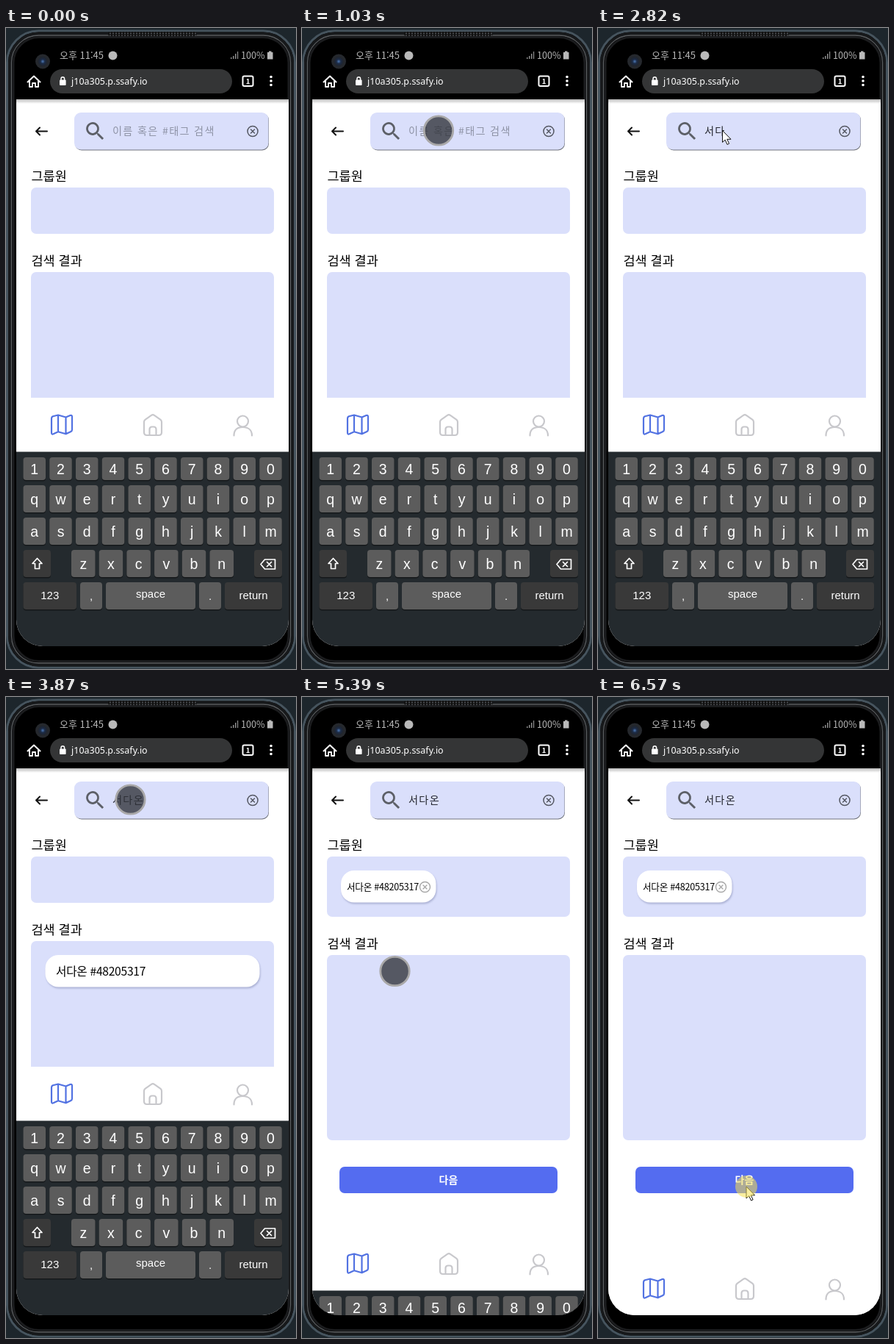
Write an HTML page that moves like this. It is 395 px wide and 872 px high and loops after 6640 ms.

```html
<!DOCTYPE html>
<html lang="ko">
<head>
<meta charset="utf-8">
<title>Group search</title>
<style>
html, body { margin: 0; width: 100%; height: 100%; overflow: hidden; background: #1d262c; }
svg { display: block; width: 395px; height: 872px; font-family: "Noto Sans CJK KR", "Noto Sans", sans-serif; }
text { white-space: pre; }
.line { fill: none; stroke-linecap: round; stroke-linejoin: round; }
.tint { fill: #dadffb; }
#keys { font-family: "Liberation Sans", Arial, sans-serif; text-anchor: middle; fill: #fff; }
#field { font-size: 14.2px; letter-spacing: 1.3px; }
.card { fill: #fff; filter: drop-shadow(1px 2px 1px #8f96bd99); }
</style>
</head>
<body>
<svg viewBox="0 0 395 872">
  <defs>
    <clipPath id="screen"><path d="M14 97H385V805a36 36 0 0 1-36 36H50a36 36 0 0 1-36-36z"/></clipPath>
    <linearGradient id="shade" x2="0" y2="1"><stop stop-color="#bbb"/><stop offset="1" stop-color="#fff"/></linearGradient>
    <radialGradient id="lens"><stop stop-color="#4d79b5"/><stop offset=".45" stop-color="#1c2b46"/><stop offset="1" stop-color="#20242b"/></radialGradient>
    <pattern id="grille" width="4" height="3" patternUnits="userSpaceOnUse"><rect width="4" height="3" fill="#111"/><circle cx="2" cy="1.5" r="1" fill="#505357"/></pattern>
  </defs>

  <!-- phone body -->
  <rect x="1.5" y="4" width="392" height="866" rx="43" stroke="#46545e" stroke-width="3"/>
  <rect x="5" y="7.5" width="385" height="859" rx="40" fill="none" stroke="#17191b" stroke-width="4"/>
  <rect x="7.5" y="10" width="380" height="854" rx="37" fill="none" stroke="#5c5f62" stroke-width="1.3"/>
  <rect x="10" y="12.5" width="375" height="849" rx="35" fill="none" stroke="#1b1c1e" stroke-width="3"/>
  <rect x="139" y="5" width="121" height="6" rx="3" fill="url(#grille)"/>
  <circle cx="50" cy="45.5" r="10" fill="#25282d"/>
  <circle cx="50" cy="45.5" r="6.5" fill="url(#lens)"/>

  <!-- status and address bars -->
  <g fill="#b9b9b9" font-size="13">
    <text x="73" y="42">오후 <tspan font-weight="500">11:45</tspan></text>
    <circle cx="145.5" cy="37.5" r="6"/>
    <path d="M306 42v-2h1.5v2zm3 0v-4h1.5v4zm3 0v-7h1.5v7zm3 0v-10h1.2v10z" opacity=".75"/>
    <text x="320" y="42" font-size="12.6">100%</text>
    <path d="M356 33h2v-1.500h3.500v1.500h2v9.500h-7.500z"/>
  </g>
  <rect x="60" y="56" width="248" height="33" rx="16.500" fill="#343536"/>
  <g class="line" stroke="#fff" stroke-width="2">
    <path d="M29.500 73.500L38 65.500l8.500 8M32 72v8h4v-5h4v5h4v-8"/>
    <rect x="322.500" y="65.500" width="14" height="13.500" rx="2"/>
    <path d="M75 71v-2a2.300 2.300 0 0 1 4.600 0v2" stroke-width="1.500"/>
  </g>
  <g fill="#fff">
    <rect x="73" y="70.500" width="8.600" height="7.500" rx="1"/>
    <text x="89" y="77" font-size="12.500" font-family="'Noto Sans', sans-serif" font-weight="500">j10a305.p.ssafy.io</text>
    <text x="329.500" y="76" font-size="9.500" font-weight="700" text-anchor="middle">1</text>
    <circle cx="361" cy="66.500" r="1.800"/><circle cx="361" cy="72" r="1.800"/><circle cx="361" cy="77.500" r="1.800"/>
  </g>

  <g clip-path="url(#screen)">
    <rect x="14" y="97" width="371" height="744" fill="#fff"/>
    <rect x="14" y="97" width="371" height="6" fill="url(#shade)"/>
    <path class="line" d="M41 140.500H56M46 135.500l-5 5 5 5" stroke="#111" stroke-width="2"/>
    <rect x="94" y="116" width="264" height="50.500" rx="9" fill="#70737c"/>
    <rect class="tint" x="93" y="115" width="264.500" height="50.500" rx="9"/>
    <path fill="#5d6068" transform="translate(105 124) scale(1.37)" d="M15.500 14h-.79l-.28-.27A6.500 6.500 0 1 0 13.730 14.430l.27.28v.79l5 4.990L20.490 19zM9.500 14a4.500 4.500 0 1 1 0-9 4.500 4.500 0 0 1 0 9z"/>
    <text id="field" x="145" y="145"></text>
    <g class="line" stroke="#555863" stroke-width="1.500"><circle cx="336" cy="140.500" r="7"/><path d="M333.500 138l5 5m0-5l-5 5"/></g>

    <text x="34.500" y="208" font-size="17.500">그룹원</text>
    <rect id="group" class="tint" x="34" y="217" width="331" rx="7"/>
    <g id="chip">
      <rect class="card" x="53" y="236" width="129.500" height="43.500" rx="18"/>
      <text x="61" y="262.500" font-size="12.600" letter-spacing="-.25" class="tag"></text>
      <g class="line" stroke="#a6a6a6" stroke-width="1.400"><circle cx="167.500" cy="258.500" r="7"/><path d="M165 256l5 5m0-5l-5 5"/></g>
    </g>
    <g id="results">
      <text x="34.500" y="323" font-size="17.500">검색 결과</text>
      <rect class="tint" x="34" y="332" width="331" height="252" rx="7"/>
      <rect x="51" y="620" width="297" height="36" rx="7" fill="#546cf0"/>
      <text x="199.500" y="643" font-size="14" font-weight="700" fill="#fff" text-anchor="middle">다음</text>
    </g>
    <g id="item">
      <rect class="card" x="53.500" y="351" width="292" height="43.500" rx="18"/>
      <text x="68" y="379" font-size="15.700" letter-spacing="-.3" class="tag"></text>
    </g>

    <g id="dock">
      <rect x="14" y="503" width="371" height="74" fill="#fff"/>
      <g class="line" stroke="#c8c8cc" stroke-width="2.200">
        <path stroke="#5272e2" d="M62 531.500q0-2.500 2-3.200l7-1.800 10.500 3 6-2.500q2.500-.8 2.500 2v17.500q0 2-2 2.800l-6.500 3-10.500-3-6.500 3q-2.500 1-2.500-2zM71 527v22M81.500 530v22"/>
        <path d="M188 536q0-2 1.500-3.200l8.500-6q2-1.400 4 0l8.500 6q1.500 1.200 1.500 3.200v14q0 4-4 4h-16q-4 0-4-4zM195.500 554v-8q0-3.500 3.500-3.500h2q3.500 0 3.500 3.500v8"/>
        <circle cx="322.500" cy="535" r="7.500"/>
        <path d="M310.500 554.500c0-8 5-11.500 12-11.500s12.500 3.500 12.500 11.500"/>
      </g>
      <rect x="14" y="576.500" width="371" height="300" fill="#242a2e"/>
      <g id="keys"></g>
      <g class="line" stroke="#fff" stroke-width="1.700">
        <path d="M42.500 721.500l-6.500 7h3.500v7h6v-7h3.500z"/>
        <path d="M347 729.500l5.500-6.500h14v13h-14zM355.500 726.500l6 6m0-6l-6 6"/>
      </g>
    </g>
  </g>

  <g id="popup">
    <path d="M213 176H223L232 167L241 176H410V232.500H213a8 8 0 0 1-8-8V184a8 8 0 0 1 8-8z" fill="#fff" style="filter:drop-shadow(0 1px 2px #0005)"/>
    <text x="221" y="210" font-size="16.800">나루</text>
  </g>

  <g id="touch">
    <circle id="disc" r="20"/>
    <circle id="ring" r="19.700" fill="none"/>
  </g>
  <g id="mouse">
    <path d="M0 0V16l3.700-3.300 2.800 6.300 2.600-1.200-2.800-6H11.500z" fill="#fff" stroke="#111"/>
    <circle id="glow" r="15" fill="#f6e04e" opacity=".55"/>
  </g>
</svg>

<script>
const $ = id => document.getElementById(id);
const LOOP = 6640, NAME = '서다온', TAG = NAME + ' #48205317';
const HINT = '이름 혹은 #태그 검색';

// Moments of change: [first, last, steps]
const runs = [[0, 0, 1], [410, 1030, 10], [1100, 1170, 2], [1380, 1510, 3], [1940, 1940, 1],
  [2350, 2620, 5], [2820, 3020, 3], [3300, 3370, 2], [3870, 3870, 1], [4220, 4430, 4],
  [4980, 4980, 1], [5190, 5190, 1], [5340, 5390, 2], [5470, 5880, 6], [6020, 6160, 3], [6500, 6570, 2]];
const ticks = runs.flatMap(([a, b, n]) =>
  Array.from({ length: n }, (_, i) => n > 1 ? a + (b - a) * i / (n - 1) : a));

const typing = [[2350, 'ㅅ'], [2480, '서'], [2610, '섣'], [2820, '서다'], [2920, '서당'], [3020, '서다오'], [3300, NAME]];

// Pointer path: [time, x, y]
const path = [[340, 345, 470], [1030, 186, 139.5], [1170, 169.5, 139.5], [4150, 169.5, 139.5],
  [4430, 126.5, 373], [5390, 126.5, 373], [5880, 190, 645], [5950, 190, 645], [6160, 202, 666]];

function pointer(t) {
  const i = path.findIndex(p => p[0] > t);
  if (i < 0) return path.at(-1).slice(1);
  if (!i) return path[0].slice(1);
  const a = path[i - 1], b = path[i];
  const u = (t - a[0]) / (b[0] - a[0]), e = u * (2 - u);
  return [a[1] + (b[1] - a[1]) * e, a[2] + (b[2] - a[2]) * e];
}

function key(x, y, w, h, label, fill = '#5c5c5c', size = 19.5, base = h / 2 + 7) {
  return `<rect x="${x}" y="${y + 1.5}" width="${w}" height="${h}" rx="4" fill="#15181a"/>
    <rect x="${x}" y="${y}" width="${w}" height="${h}" rx="4" fill="${fill}"/>
    <text x="${x + w / 2}" y="${y + base}" font-size="${size}">${label}</text>`;
}

const row = (chars, x, y, w, h, pitch) =>
  [...chars].map((c, i) => key(x + i * pitch, y, w, h, c)).join('');

const DARK = '#393939';
$('keys').innerHTML = row('1234567890', 23.5, 584, 30.5, 31, 35.75)
  + row('qwertyuiop', 23.5, 622, 30.5, 37, 35.75)
  + row('asdfghjklm', 23.5, 666, 30.5, 37, 35.75)
  + row('zxcvbn', 89, 710, 32.5, 37, 37.7)
  + key(23.5, 710, 37.5, 37, '', DARK) + key(338, 710, 38, 37, '', DARK)
  + key(23.5, 754, 72.5, 37, '123', DARK, 15, 23) + key(101, 754, 30, 37, ',', undefined, 15, 24)
  + key(136, 754, 122, 37, 'space', undefined, 15, 21) + key(263, 754, 30, 37, '.', undefined, 15, 24)
  + key(298, 754, 78, 37, 'return', DARK, 15, 23);
document.querySelectorAll('.tag').forEach(el => el.textContent = TAG);

const show = (id, on) => $(id).style.display = on ? '' : 'none';
const move = (id, x, y) => $(id).setAttribute('transform', `translate(${x} ${y})`);
const paint = (id, attrs) => Object.entries(attrs).forEach(([k, v]) => $(id).setAttribute(k, v));

function draw(now) {
  const t = ticks.findLast(x => x <= now % LOOP);
  const typed = typing.findLast(s => s[0] <= t);
  $('field').textContent = typed ? typed[1] : HINT;
  paint('field', { fill: typed ? '#23252d' : '#8e93a6' });

  const added = t >= 5340;
  paint('group', { height: added ? 82 : 63 });
  move('results', 0, added ? 19 : 0);
  show('chip', added);
  show('item', t >= 3370 && !added);
  show('popup', t >= 1440 && t < 2350);

  // The keyboard slides away, decelerating
  const u = Math.min(1, Math.max(0, (t - 5310) / 125));
  move('dock', 0, 265 * (1 - (1 - u) ** 2.01));

  const [x, y] = pointer(t);
  const arrow = t >= 1940 && t < 3870 || t >= 6500;
  const pressed = t >= 1380 && t < 1440 || t >= 5190 && t < 5340;
  show('touch', t >= 410 && !arrow);
  show('mouse', arrow);
  show('glow', t >= 6570);
  move('touch', x, y);
  move('mouse', x, y);
  paint('disc', pressed ? { fill: '#b09e14', opacity: .88 } : { fill: '#303239', opacity: .78 });
  paint('ring', pressed ? { stroke: '#77777d', 'stroke-width': 4 } : { stroke: '#a9a8a8', 'stroke-width': 2.8 });
}

const start = performance.now();
(function frame() {
  draw(performance.now() - start);
  requestAnimationFrame(frame);
})();
</script>
</body>
</html>
```
